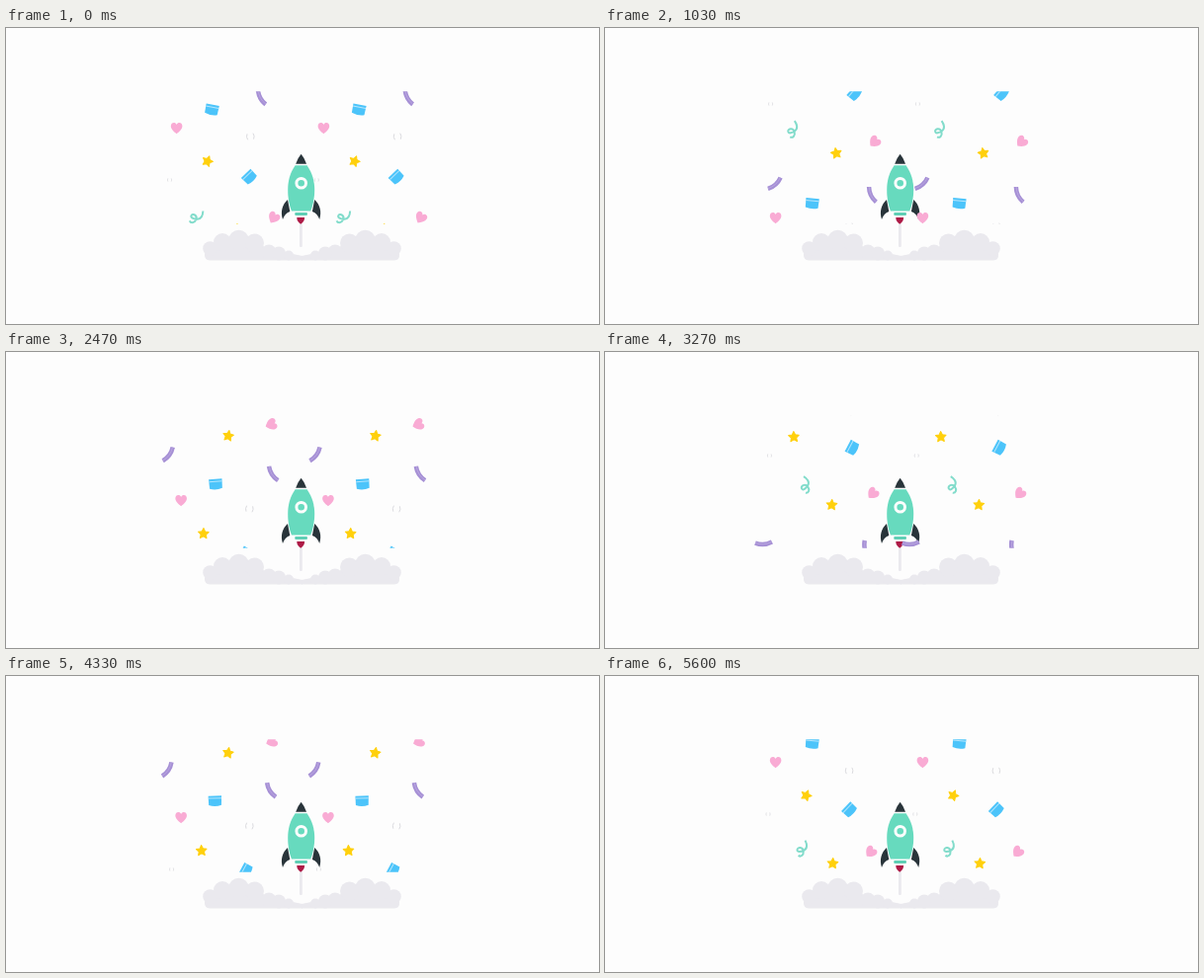
An HTML page that plays this animation: 600 by 300 pixels, repeating every 5.66 s.

```html
<!DOCTYPE html>
<html lang="en">
<head>
<meta charset="utf-8">
<title>Rocket launch with confetti</title>
<style>
  html, body { margin: 0; width: 100%; height: 100%; overflow: hidden; background: #fdfdfd; }
  svg { display: block; width: 100%; height: 100%; }
</style>
</head>
<body>
<svg viewBox="0 0 600 300">
  <defs>
    <clipPath id="window"><rect x="150" y="64.3" width="280" height="134.5"/></clipPath>

    <path id="heart" fill="#f9abd4" d="M0 5.8C-3 3.4-5.8 1-5.8-2.2C-5.8-6-1.3-6.8 0-3.6C1.3-6.8 5.8-6 5.8-2.2C5.8 1 3 3.4 0 5.8Z"/>
    <path id="star" fill="#ffd00c" stroke="#ffd00c" stroke-linejoin="round"/>
    <g id="cup">
      <path fill="#4cc4fa" d="M-6.7-5.3H6.7L6.4 4.2Q0 6.4-6.4 4.2Z"/>
      <path fill="none" stroke="#b5e6fd" d="M-6.6-2.8H6.6"/>
    </g>
    <g id="strip" fill="none">
      <path stroke="#a690d5" stroke-width="4.5" d="M-8.5-1Q0 2.8 8.5-1"/>
      <path stroke="#bba9e1" stroke-width=".8" d="M-8.4-1.2Q0 2.6 8.4-1.2"/>
    </g>
    <path id="curl" fill="none" stroke="#82dccb" stroke-width="2"
      d="M4.5-9C6-5 6.2-.5 2 1C-1 2-5 2.5-4.5-.5C-4-3 1.5-3 1.5 2C1.5 6-2 7.5-4 5.5"/>
    <path id="ball" fill="none" stroke="#d8d8dc" stroke-width=".9" d="M-3-3Q-4.6 0-3 3M3-3Q4.6 0 3 3"/>
    <path id="bead" fill="none" stroke="#dcdce0" stroke-width=".8" d="M-1.7-1.6Q-2.5 0-1.7 1.6M1.7-1.6Q2.5 0 1.7 1.6"/>

    <g id="cloud" fill="#eae9ee">
      <path d="M206 235.5Q200.5 235.5 201 229L207 220L222 213H250L264 224L285 228L300 231V235.5Z"/>
      <circle cx="206.5" cy="223.5" r="7.3"/>
      <circle cx="219" cy="217" r="9"/>
      <circle cx="235.5" cy="215" r="10.3"/>
      <circle cx="251.5" cy="218" r="9.5"/>
      <circle cx="266" cy="227" r="7.6"/>
      <circle cx="276" cy="228.5" r="7"/>
      <circle cx="286" cy="230.5" r="5"/>
    </g>
    <path id="fin" fill="#29343a" d="M285 174C279.5 179 277.5 186 280 194C281.5 190 283.5 187.5 287.3 186Z"/>
  </defs>

  <rect width="600" height="300" fill="#fdfdfd"/>
  <use href="#cloud"/>
  <use href="#cloud" transform="matrix(-1 0 0 1 599 0)"/>

  <rect x="297" y="198" width="2.8" height="24" rx="1" fill="#eae9ee"/>
  <path fill="#ae1b47" d="M294.3 192H302.1C302.3 195.3 300.3 197.2 298.2 198.8C296.1 197.2 294.1 195.3 294.3 192Z"/>
  <use href="#fin"/>
  <use href="#fin" transform="matrix(-1 0 0 1 597.2 0)"/>
  <path fill="#67dabe" d="M292.6 139.3H304.6C309.8 147 312.2 155 312.2 164C312.2 172 310.6 180 308.2 185.4H289C286.6 180 285.2 172 285.2 164C285.2 155 287.4 147 292.6 139.3Z"/>
  <path fill="#29343a" d="M298.6 127.8Q302.2 132 304 137.8H293.2Q295 132 298.6 127.8Z"/>
  <rect x="292.3" y="187" width="12.6" height="3" rx=".8" fill="#5fcfb5"/>
  <circle cx="298.7" cy="157.2" r="4.8" fill="#67dabe" stroke="#fdfdfd" stroke-width="3"/>

  <g clip-path="url(#window)">
    <g id="tile"></g>
    <use href="#tile" x="148.8"/>
  </g>
</svg>

<script>
const LOOP = 5660, CYCLE = 24, ENTRY = 48;

// Each piece falls steadily while one cosine wave sways and tilts it.
// x, y and angle hold at step "peak", the top of the wave;
// fall, drift and roll are rates per step.
const rest = { fall: 7, drift: 0, sway: 0, period: 13, angle: 0, roll: 0, swing: 0 };
const pieces = [
  { shape: "ball", peak: 24, x: 246.8, y: 110, sway: .5, swing: -6 },
  { shape: "bead", peak: 30, x: 166.3, y: 196, sway: 1.3, period: 17 },
  { shape: "star", peak: 22.7, x: 198.9, y: 126, drift: .52, sway: 5.3, angle: 10, swing: 13 },
  { shape: "star", peak: 13, x: 230, y: 127, drift: .2, sway: 4, swing: -10 },
  { shape: "cup", peak: 32.5, x: 210.3, y: 145, fall: 7.3, sway: 2.3, period: 15, angle: 3, swing: -9 },
  { shape: "cup", peak: 17, x: 250.4, y: 97.2, fall: 7.7, drift: -.58, angle: -53, swing: -9 },
  { shape: "heart", peak: 30.5, x: 174.8, y: 147, sway: 2.4, period: 15 },
  { shape: "heart", peak: 14, x: 270.5, y: 122.5, sway: 2.4, angle: 50, roll: -1.8, swing: -8 },
  { shape: "strip", peak: 12, x: 167, y: 149, fall: 9, drift: -.4, sway: 6, angle: -37, roll: 5, swing: -11 },
  { shape: "strip", peak: 33.5, x: 266.7, y: 142.5, fall: 7.6, drift: .3, sway: 6, period: 18, angle: 64, roll: .9, swing: -7 },
  { shape: "curl", peak: 19, x: 198, y: 152, fall: 8, sway: 8.5, angle: -15, roll: 4, swing: -25 },
].map(piece => ({ ...rest, ...piece }));

function starPath(outer, inner) {
  const corners = Array.from({ length: 10 }, (_, i) => {
    const r = i % 2 ? inner : outer, a = i * Math.PI / 5;
    return `${r * Math.sin(a)} ${-r * Math.cos(a)}`;
  });
  return "M" + corners.join("L") + "Z";
}
document.getElementById("star").setAttribute("d", starPath(5.6, 2.8));

const tile = document.getElementById("tile");
for (const piece of pieces) {
  piece.node = document.createElementNS("http://www.w3.org/2000/svg", "use");
  piece.node.setAttribute("href", "#" + piece.shape);
  tile.append(piece.node);
}

// 80 ms steps, snapped to thirtieths of a second and then to 10 ms.
const stepStart = n => Math.round(Math.round(n * 2.4) * 10 / 3) * 10;

function stepAt(ms) {
  let n = Math.floor(ms / 80) + 1;
  while (stepStart(n) > ms) n--;
  return n;
}

const mod = (a, n) => ((a % n) + n) % n;

function place(p, step) {
  const first = Math.ceil(p.peak - (p.y - ENTRY) / p.fall);
  const d = first + mod(step - first, CYCLE) - p.peak;
  const wave = Math.cos(2 * Math.PI * d / p.period);
  const x = p.x + p.drift * d + p.sway * wave;
  const y = p.y + p.fall * d;
  const angle = p.angle + p.roll * d + p.swing * wave;
  p.node.setAttribute("transform", `translate(${x} ${y}) rotate(${angle})`);
}

const begin = performance.now();
function tick(now) {
  const step = stepAt(Math.max(0, now - begin) % LOOP);
  pieces.forEach(piece => place(piece, step));
  requestAnimationFrame(tick);
}
tick(begin);
</script>
</body>
</html>
```
